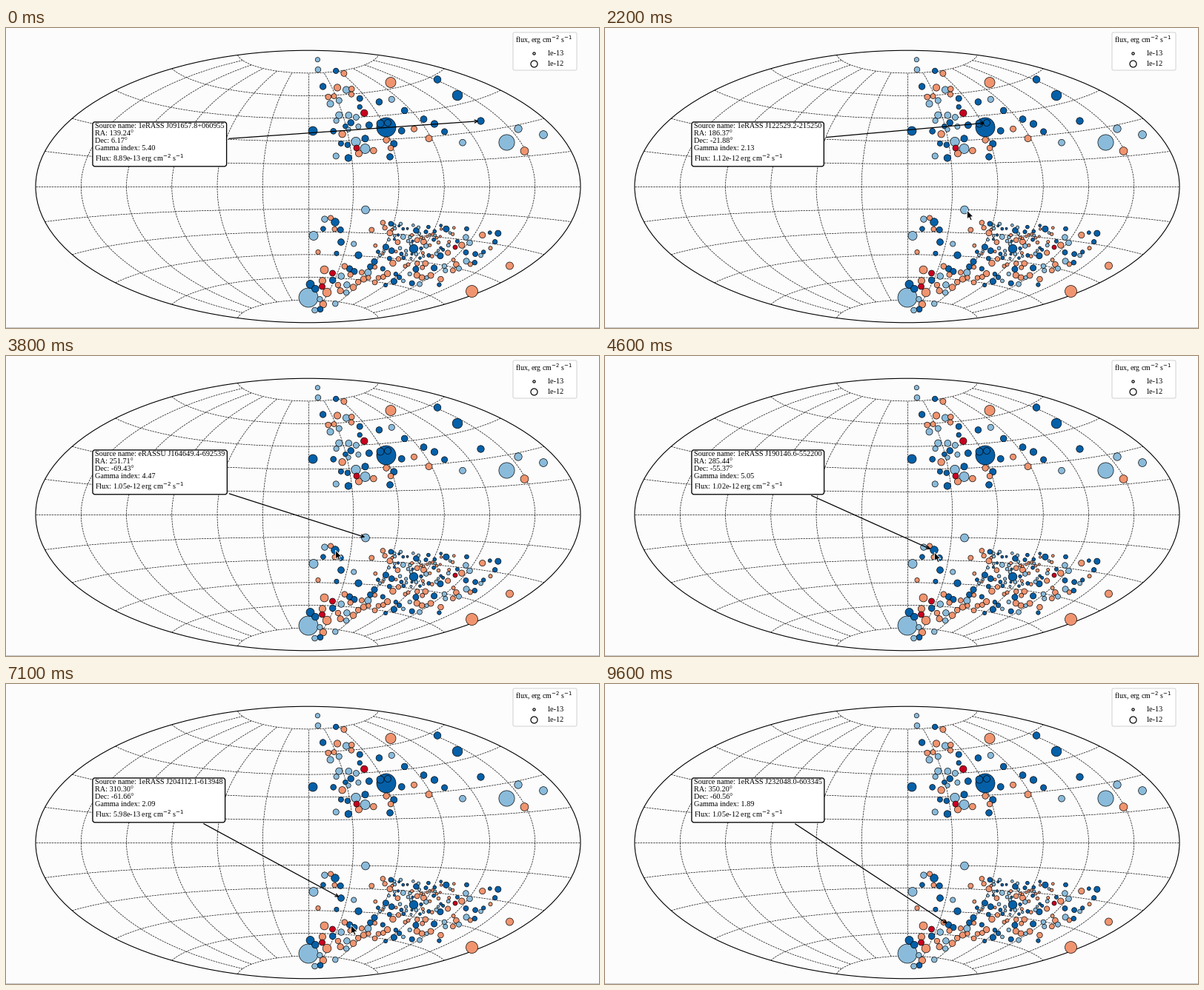
Write a matplotlib script that moves like this. It is 800 by 405 pixels and loops after 9.7 s.

```python
import numpy as np
import matplotlib.pyplot as plt
from matplotlib.animation import FuncAnimation
from matplotlib.patches import FancyBboxPatch, Polygon

W, H, DPI = 800, 405, 100
STEP, FRAMES = 100, 97
CX, CY, RX = 407.5, 214, 367.5
PAPER = "#fcfcfc"
DARK, LIGHT, SALMON, RED = "#0560a8", "#8abbdb", "#f0946f", "#c8001f"

plt.rcParams["font.family"] = "Liberation Serif"
plt.rcParams["mathtext.fontset"] = "dejavusans"

# The most prominent sources: x, y, radius in pixels
LANDMARKS = {
    DARK: [(513, 134, 13), (515, 128, 4.5), (505, 129, 5), (640.5, 125.5, 4.7),
           (609, 91, 6.8), (582, 69.5, 4.8), (578, 129.5, 4.7), (414, 139, 6),
           (444, 262, 5.3), (452, 289, 4.4), (463.5, 325, 4.2),
           (410.5, 346, 5.5), (550, 298, 5.8)],
    LIGHT: [(675.5, 154.5, 10.6), (725, 144, 5.4), (691, 136, 5.2),
            (484.5, 163, 6.5), (472, 153.5, 6.2), (485, 245.5, 5.4),
            (415, 280.5, 6), (408, 364, 13)],
    SALMON: [(519, 73.5, 7), (699.5, 166, 5.4), (679.5, 321, 5),
             (628.5, 355.5, 8), (429.5, 326.5, 5.4), (433, 357, 5.8)],
    RED: [(473, 162, 4), (440.5, 331, 4), (426.5, 349, 4), (606, 296, 3)],
}

# Count, longitude range, latitude range (degrees), radius range
SWARMS = [
    (34, (17, 62), (18, 66), (3.2, 4.8)),
    (9, (66, 112), (20, 56), (3.6, 4.6)),
    (4, (2, 80), (73, 85), (3, 4)),
    (10, (8, 50), (-45, -16), (3, 4.8)),
    (18, (5, 60), (-82, -52), (3.6, 4.8)),
    (60, (60, 106), (-44, -23), (1.5, 2.6)),
    (78, (52, 140), (-62, -23), (2.4, 4.2)),
]


def aitoff(lon, lat):
    """Sky position in degrees to pixels."""
    lon, lat = np.radians(lon) / 2, np.radians(lat)
    a = np.arccos(np.cos(lat) * np.cos(lon))
    k = RX / np.pi / np.sinc(a / np.pi)
    return CX + 2 * k * np.cos(lat) * np.sin(lon), CY - k * np.sin(lat)


def sources():
    points = [(*p, col) for col, pts in LANDMARKS.items() for p in pts]
    rng = np.random.default_rng(5)
    for count, lons, lats, radii in SWARMS:
        placed = tries = 0
        while placed < count and tries < 3000:
            tries += 1
            x, y = aitoff(rng.uniform(*lons), rng.uniform(*lats))
            r = rng.uniform(*radii)
            if all(np.hypot(x - p[0], y - p[1]) > .85 * (r + p[2]) for p in points):
                col = rng.choice([DARK, LIGHT, SALMON, RED], p=[.31, .31, .37, .01])
                points.append((x, y, r, col))
                placed += 1
    return sorted(points, key=lambda p: -p[2])


def dots(ax, points, lw, z):
    x, y, r, col = zip(*points)
    area = (2 * np.array(r) * 72 / DPI) ** 2
    ax.scatter(x, y, s=area, c=col, edgecolors="k", linewidths=lw, zorder=z)


fig = plt.figure(figsize=(W / DPI, H / DPI), dpi=DPI, facecolor=PAPER)

sky = fig.add_axes([(CX - RX) / W, 1 - (CY + RX / 2) / H, 2 * RX / W, RX / H],
                   projection="aitoff", facecolor=PAPER)
sky.grid(True, color="k", ls="--", lw=.48)
sky.set_xticklabels([])
sky.set_yticklabels([])
sky.spines["geo"].set_linewidth(.8)

ax = fig.add_axes([0, 0, 1, 1], xlim=(0, W), ylim=(H, 0))
ax.axis("off")
ax.plot([0, W], [404, 404], color="#c4c4c4", lw=.8)
dots(ax, sources(), .48, 3)

# Size legend
ax.add_patch(FancyBboxPatch((686, 8), 82, 47, boxstyle="round,pad=2,rounding_size=2",
                            fc="white", ec="#d0d0d0", lw=.7))
ax.text(726, 20, "flux, erg cm$^{-2}$ s$^{-1}$", size=7.2, ha="center")
for y, r, label in [(33.5, 1.6, "1e-13"), (47.8, 4.5, "1e-12")]:
    dots(ax, [(711.5, y, r, "white")], .85, 4)
    ax.text(729.3, y + 3.4, label, size=7.4)

# Click time in ms, marked point, name, gamma index, flux
PICKS = [
    (0, (640.5, 125.5), "1eRASS J091657.8+060955", 5.40, 8.89e-13),
    (1500, (515, 128), "1eRASS J122529.2-215250", 2.13, 1.12e-12),
    (2600, (487, 245.5), "eRASSU J164649.4-692539", 4.47, 1.05e-12),
    (4300, (442, 262), "1eRASS J190146.6-552200", 5.05, 1.02e-12),
    (5900, (452, 289), "1eRASS J204112.1-613948", 2.09, 5.98e-13),
    (7500, (464, 325), "1eRASS J232048.0-603345", 1.89, 1.05e-12),
]
CLICKS = [p[0] for p in PICKS]
SPOTS = np.array([p[1] for p in PICKS])


def sexagesimal(digits):
    return int(digits[:2]) + int(digits[2:4]) / 60 + float(digits[4:]) / 3600


def callout(spot, name, gamma, flux):
    """Info box; the coordinates are read from the name's J-number."""
    code = name.split("J")[1]
    ra = 15 * sexagesimal(code[:8])
    dec = sexagesimal(code[9:]) * (-1 if code[8] == "-" else 1)
    label = (f"Source name: {name}\nRA: {ra:.2f}°\nDec: {dec:.2f}°\n"
             f"Gamma index: {gamma:.2f}\n"
             f"Flux: {flux:.2e} erg cm$^{{-2}}$ s$^{{-1}}$")
    return ax.annotate(label, xy=spot, xytext=(120, 128), size=7.4, va="top",
                       linespacing=1.12,
                       bbox=dict(boxstyle="round,pad=0.3", fc="white", lw=.95),
                       arrowprops=dict(arrowstyle="->", lw=.9), zorder=6)


callouts = [callout(*p[1:]) for p in PICKS]

ARROW = np.array([(0, 0), (0, 12), (2.7, 9.6), (4.7, 13.8), (6.6, 13),
                  (4.8, 8.9), (8.5, 8.7)])
cursor = ax.add_patch(Polygon(ARROW, fc="k", ec="white", lw=.6, zorder=8))
CURSOR_ON, CURSOR_OFF = 700, 8000
LEAVE, SETTLE = 100, 400


def cursor_tip(t, k):
    """Ease from pick k to the next, settling shortly before its click."""
    if k + 1 == len(PICKS):
        return SPOTS[k]
    start, end = CLICKS[k] + LEAVE, CLICKS[k + 1] - SETTLE
    u = np.clip((t - start) / (end - start), 0, 1)
    return SPOTS[k] + (SPOTS[k + 1] - SPOTS[k]) * u * u * (3 - 2 * u)


def draw(i):
    t = i * STEP
    current = sum(c <= t for c in CLICKS) - 1
    for k, note in enumerate(callouts):
        note.set_visible(k == current)
    cursor.set_visible(CURSOR_ON <= t <= CURSOR_OFF)
    cursor.set_xy(ARROW + cursor_tip(t, current) + (1.5, .5))
    return [*callouts, cursor]


anim = FuncAnimation(fig, draw, frames=FRAMES, interval=STEP, repeat=True,
                     repeat_delay=0)
plt.show()
```
